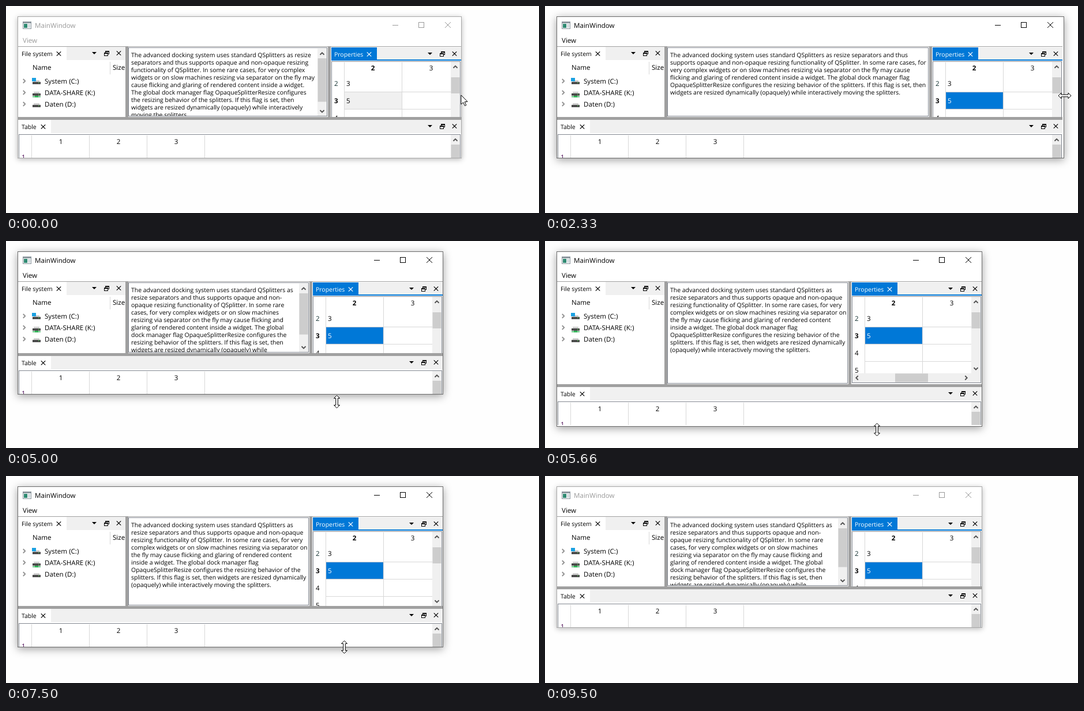
Write an HTML page with a canvas that moves like this. It is 924 px wide and 360 px high and loops after 9.66 s.

```html
<!DOCTYPE html>
<html lang="en">
<head>
<meta charset="utf-8">
<title>Docking window</title>
<style>
html, body { margin: 0; width: 100%; height: 100%; overflow: hidden; background: #fefefe; }
canvas { display: block; }
</style>
</head>
<body>
<canvas id="stage" width="924" height="360"></canvas>
<script>
const ctx = document.getElementById('stage').getContext('2d');
const LOOP = 9660, SMALL = 10.45, NORMAL = 11.6;
const GREY = '#a0a0a0', PANEL = '#f0f0f0', BLUE = '#0078d7', EDGE = '#828790', GRID = '#d8d8d8';
const MESSAGE = 'The advanced docking system uses standard QSplitters as resize separators ' +
  'and thus supports opaque and non-opaque resizing functionality of QSplitter. In some rare cases, ' +
  'for very complex widgets or on slow machines resizing via separator on the fly may cause flicking ' +
  'and glaring of rendered content inside a widget. The global dock manager flag OpaqueSplitterResize ' +
  'configures the resizing behavior of the splitters. If this flag is set, then widgets are resized ' +
  'dynamically (opaquely) while interactively moving the splitters.';

// Tracks hold [step, value] pairs; six steps make a second.
const RIGHT = [[5, 790], [6, 795], [9, 831], [12, 889], [14, 900], [15, 892], [19, 824], [22, 758]];
const BOTTOM = [[29, 265], [29.6, 267], [30, 267], [33, 318], [34, 323], [36, 324], [39, 324], [40, 331],
  [41.5, 339], [45, 298], [46, 286], [49, 268], [51, 264]];
const CURSOR_X = [[5, 790], [9, 839], [12, 890], [14, 901], [16, 880], [19, 817.5], [22, 757.5],
  [23, 757.5], [24, 752], [25, 715], [27, 600], [28, 573.5], [30, 573.5], [34, 575.5], [39, 575.5],
  [45, 586.5], [49, 595.5], [51, 596]];
const CURSOR_Y = [[9, 156.5], [19, 155.5], [23, 156], [24, 136], [25, 150], [27, 250], [28, 270], [29, 270],
  [30, 279.5], [34, 328], [39, 328], [41, 341.5], [42, 338], [45, 297.5], [49, 272], [51, 268.5]];

function at(track, step) {
  const next = track.findIndex(key => key[0] > step);
  if (next === 0) return track[0][1];
  if (next < 0) return track[track.length - 1][1];
  const [s0, v0] = track[next - 1], [s1, v1] = track[next];
  return v0 + (v1 - v0) * (step - s0) / (s1 - s0);
}

function box(x, y, w, h, color) {
  ctx.fillStyle = color;
  ctx.fillRect(x, y, w, h);
}

function frame(x, y, w, h, color) {
  ctx.strokeStyle = color;
  ctx.lineWidth = 1;
  ctx.strokeRect(x + .5, y + .5, w - 1, h - 1);
}

function path(points, color, width) {
  ctx.beginPath();
  points.forEach(([x, y]) => ctx.lineTo(x, y));
  ctx.strokeStyle = color;
  ctx.lineWidth = width;
  ctx.stroke();
}

function setFont(size, weight = 400) {
  ctx.font = `${weight} ${size}px "Open Sans", "Noto Sans", sans-serif`;
}

// y is the middle of the lower-case letters' line.
function text(string, x, y, { size = NORMAL, color = '#000', align = 'left', weight = 400 } = {}) {
  setFont(size, weight);
  ctx.textAlign = align;
  ctx.fillStyle = color;
  ctx.fillText(string, x, y + 4);
}

function cross(x, y, r, color, width = 1.2) {
  path([[x - r, y - r], [x + r, y + r]], color, width);
  path([[x - r, y + r], [x + r, y - r]], color, width);
}

function chevron(x, y, angle, color = '#505050', r = 3.5) {
  const point = (a, b) => [x + a * Math.cos(angle) - b * Math.sin(angle), y + a * Math.sin(angle) + b * Math.cos(angle)];
  path([point(-r, r / 2), point(0, -r / 2), point(r, r / 2)], color, 1.8);
}

function clipped(x, y, right, bottom, draw) {
  ctx.save();
  ctx.beginPath();
  ctx.rect(x, y, right - x, bottom - y);
  ctx.clip();
  draw();
  ctx.restore();
}

function vScroll(x, top, bottom, thumbTop, thumbHeight) {
  box(x, top, 16, bottom - top, PANEL);
  box(x + .5, thumbTop, 15, thumbHeight, '#cdcdcd');
  chevron(x + 8, top + 9, 0);
  chevron(x + 8, bottom - 8, Math.PI);
}

function tabBar(title, left, right, top, tabWidth, active) {
  box(left, top, right - left, 23, PANEL);
  box(left, top, tabWidth, 23, active ? BLUE : '#fff');
  if (active) box(left, top + 21, right - left, 2, BLUE);
  const ink = active ? '#fff' : '#000', y = top + 11;
  text(title, left + 5, y + 1, { size: SMALL, color: ink });
  cross(left + tabWidth - 13.5, y + 1, 3.7, ink);
  ctx.fillStyle = '#000';
  ctx.beginPath();
  ctx.moveTo(right - 58, y - 2);
  ctx.lineTo(right - 50, y - 2);
  ctx.lineTo(right - 54, y + 2);
  ctx.fill();
  const x = right - 33;
  frame(x - 2, y - 4, 7, 6, '#000');
  box(x - 2, y - 4, 7, 2, '#000');
  box(x - 4, y - 1, 7, 6, PANEL);
  frame(x - 4, y - 1, 7, 6, '#000');
  box(x - 4, y - 1, 7, 2, '#000');
  cross(right - 11.5, y, 3.7, '#000');
}

function drive(y, accent) {
  box(48, y - 2, 10, 3, '#d2d2d2');
  box(46, y + 1, 14, 4, '#4a4a4a');
  box(56, y + 2, 2, 1, '#5fd35f');
  if (accent === 'system') box(45, y - 6, 7, 6, '#1ba1e2');
  if (accent === 'network') {
    box(46, y + 6, 14, 1.5, '#35b35a');
    box(50, y + 5, 6, 3, '#35b35a');
  }
}

function fileDock(bottom) {
  box(22, 71, 185, bottom - 71, '#fff');
  tabBar('File system', 22, 207, 71, 83, false);
  text('Name', 46, 107);
  box(180, 97, 1, 22, GRID);
  clipped(181, 95, 206, 120, () => text('Size', 185, 107));
  [['System (C:)', 'system'], ['DATA-SHARE (K:)', 'network'], ['Daten (D:)', '']].forEach(([name, kind], i) => {
    const y = 131 + 20 * i;
    chevron(31.5, y - .5, Math.PI / 2, '#909090');
    drive(y, kind);
    text(name, 67, y);
  });
}

function wrap(width) {
  setFont(SMALL);
  const lines = [''];
  for (const chunk of MESSAGE.match(/[^ -]+-? ?/g)) {
    const last = lines.length - 1;
    if (ctx.measureText((lines[last] + chunk).trimEnd()).width > width) lines.push(chunk);
    else lines[last] += chunk;
  }
  return lines;
}

function textDock(right, bottom) {
  const height = bottom - 72, room = right - 218.5;
  let lines = wrap(room);
  const scrolls = lines.length * 13 + 15 > height;
  if (scrolls) lines = wrap(room - 19);
  box(212, 71, right - 211, bottom - 71, '#fff');
  clipped(213, 73, right - 1, bottom - 2, () => {
    lines.forEach((line, i) => text(line, 217, 84.5 + 13 * i, { size: SMALL }));
  });
  if (scrolls) {
    const thumb = (height - 38) * height / (lines.length * 13 + 16);
    vScroll(right - 17, 74, bottom - 2, 91, thumb);
  }
  frame(212, 72, right - 212, height - 1, EDGE);
}

function propertiesDock(left, right, bottom, selected) {
  const tableBottom = Math.max(bottom - 2, 243), gridBottom = tableBottom - 17, scrollX = right - 18;
  box(left, 71, right - left, bottom - 71, '#fff');
  tabBar('Properties', left + 1, right, 72, 79, true);
  clipped(left + 1, 96, scrollX, gridBottom, () => {
    text('2', left + 73, 108, { align: 'center', weight: 700 });
    text('3', left + 174, 108, { align: 'center' });
    box(left + 23, 98, 1, gridBottom - 98, GRID);
    box(left + 123, 98, 1, gridBottom - 98, GRID);
    for (let row = 2; row <= 5; row++) {
      const y = 60 + 30 * row;
      text(row, left + 6, y + 15, { weight: row === 3 ? 700 : 400, color: row === 2 ? '#123030' : '#000' });
      box(left + 23, y + 29, scrollX - left - 23, 1, GRID);
    }
    box(left + 24, 150, 99, 29, selected ? BLUE : PANEL);
    if (selected) {
      ctx.setLineDash([1, 1]);
      frame(left + 24, 150, 99, 29, '#4a8fd0');
      ctx.setLineDash([]);
    }
    text('3', left + 27, 134.5);
    text('5', left + 27, 164.5, { color: selected ? '#fff' : '#000' });
  });
  vScroll(scrollX, 97, gridBottom, 124, 28);
  box(left + 2, gridBottom, right - left - 4, 16, PANEL);
  box(left + 76, gridBottom + .5, 57, 15, '#cdcdcd');
  chevron(left + 10, gridBottom + 8, -Math.PI / 2);
  chevron(right - 27, gridBottom + 8, Math.PI / 2);
  frame(left + 1, 96, right - left - 2, tableBottom - 96, EDGE);
}

function tableDock(right, top, bottom) {
  const tableTop = bottom - 42;
  box(22, top, right - 22, bottom - top, '#fff');
  tabBar('Table', 22, right, top, 56, false);
  for (let i = 0; i < 4; i++) {
    const x = 44 + 100 * i;
    box(x, tableTop + 2, 1, 40, GRID);
    if (i < 3) text(i + 1, x + 51, bottom - 29, { align: 'center' });
  }
  text('1', 27, bottom - 2, { color: '#4b0a55' });
  box(right - 18, tableTop + 1, 16, 42, PANEL);
  chevron(right - 10, bottom - 32, 0);
  box(right - 17.5, bottom - 24, 15, 30, '#cdcdcd');
  frame(22, tableTop, right - 23, 60, EDGE);
}

function titleBar(right, active, menuActive) {
  const ink = active ? '#000' : '#999';
  box(29, 27, 15, 13, '#8b959c');
  box(30, 30, 13, 9, '#f4f7f8');
  box(31, 31, 6, 7, '#2f8a72');
  box(38, 31, 4, 7, '#d5dde0');
  text('MainWindow', 50, 34, { color: ink });
  text('View', 29, 60, { color: menuActive ? '#000' : '#999' });
  box(right - 120, 33, 10, 1, ink);
  frame(right - 75, 28, 10, 10, ink);
  cross(right - 24, 33, 5, ink, 1);
}

function cursor(step) {
  if (step >= 54) return;
  const arrow = step < 3 || (step >= 24 && step < 28) || step === 53;
  let x = at(CURSOR_X, step), y = at(CURSOR_Y, step);
  if (step < 3) [x, y] = [789, 155];
  if (step === 53) y = 258;
  ctx.save();
  ctx.translate(x, y);
  if (!arrow && step >= 28) ctx.rotate(Math.PI / 2);
  const half = [[-11, 0], [-6, -5], [-6, -1.8], [6, -1.8], [6, -5], [11, 0]];
  const shape = arrow
    ? [[0, 0], [0, 16], [3.7, 12.6], [6.4, 18.6], [8.8, 17.5], [6.2, 11.7], [11, 11.3]]
    : half.concat(half.slice(1, -1).reverse().map(([a, b]) => [a, -b]));
  ctx.beginPath();
  shape.forEach(([a, b]) => ctx.lineTo(a, b));
  ctx.closePath();
  ctx.fillStyle = '#fff';
  ctx.fill();
  ctx.strokeStyle = '#000';
  ctx.lineWidth = 1;
  ctx.stroke();
  ctx.restore();
}

function draw(time) {
  const step = Math.floor(time * .006 + .041);
  const active = step >= 6 && step < 57, awake = step >= 6;
  const right = Math.round(at(RIGHT, step)), bottom = Math.round(at(BOTTOM, step));
  // The contents trail a growing window a little.
  const innerRight = Math.min(right, Math.round(at(RIGHT, step - .4)));
  const innerBottom = Math.min(bottom, Math.round(at(BOTTOM, step - .4)));
  const split = innerBottom - 72, dockRight = innerRight - 1, propertiesLeft = innerRight - 227;

  box(0, 0, 924, 360, '#fefefe');
  ctx.save();
  ctx.shadowColor = active ? 'rgba(0,0,0,.38)' : 'rgba(0,0,0,.28)';
  ctx.shadowBlur = active ? 14 : 9;
  ctx.shadowOffsetY = active ? 3 : 2;
  box(20, 18, right - 20, bottom - 18, active ? '#6a6a6a' : '#a8a8a8');
  ctx.restore();
  box(21, 19, right - 22, bottom - 20, '#fff');
  titleBar(right, active, awake);

  clipped(21, 70, dockRight, bottom - 1, () => {
    box(21, 70, dockRight - 21, split - 65, GREY);
    clipped(21, 71, dockRight, split, () => {
      box(21, 71, 1, split - 71, '#fff');
      fileDock(split);
      textDock(propertiesLeft - 6, split);
      propertiesDock(propertiesLeft, dockRight, split, awake);
    });
    clipped(21, split + 5, dockRight, innerBottom - 1, () => {
      box(21, split + 5, 1, 80, '#fff');
      tableDock(dockRight, split + 5, innerBottom);
    });
  });
  cursor(step);
}

ctx.textRendering = 'geometricPrecision';
function tick() {
  draw(performance.now() % LOOP);
  requestAnimationFrame(tick);
}
tick();
</script>
</body>
</html>
```
